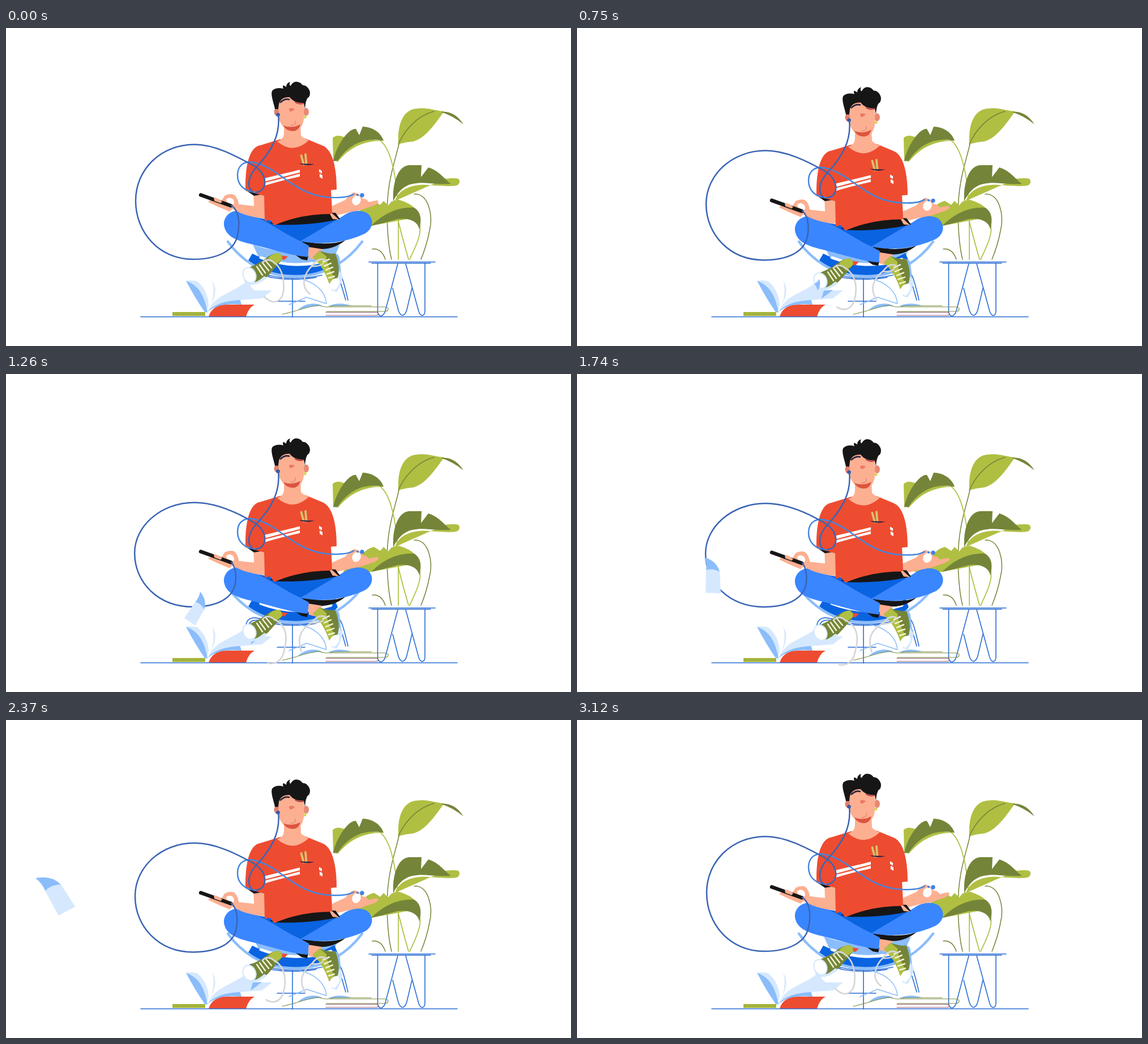
An HTML page that plays this animation: 998 px wide and 561 px high, repeating every 3150 ms.

```html
<!DOCTYPE html>
<html lang="en">
<head>
<meta charset="utf-8">
<title>Meditation</title>
<style>
  html, body { margin: 0; width: 100%; height: 100%; overflow: hidden; background: #fff; }
  svg { display: block; width: 100%; height: 100%; }
  .red { fill: #ed4c31 } .skin { fill: #fdaf91 } .ink { fill: #161616 }
  .blue { fill: #3a86ff } .deep { fill: #0a63e0 } .sky { fill: #8bbdfb } .pale { fill: #d5e8fe }
  .lime { fill: #b0bf42 } .moss { fill: #748539 } .white { fill: #fff }
  .line { fill: none; stroke-linecap: round; stroke-linejoin: round }
  .frame { stroke: #2a6dd4; stroke-width: 1.6 }
</style>
</head>
<body>
<svg viewBox="0 0 998 561">
  <g id="plant">
    <g class="line" stroke="#748539" stroke-width="1.5">
      <path d="M694 205C686 240 673 270 673 330Q674 380 681 408"/>
      <path d="M721 293C746 291 755 330 748 358Q743 384 733 408"/>
      <path d="M647 390Q663 388 670 408"/>
    </g>
    <g class="line" stroke="#b0bf42" stroke-width="1.7">
      <path d="M658 196C676 208 684 240 689 275C694 320 693 360 693 408"/>
      <path d="M685 303C690 335 703 380 711 408"/>
      <path d="M730 345C736 360 724 385 713 408"/>
    </g>
    <path class="lime" d="M693 205C691 165 704 142 728 142C745 140 757 146 774 147C757 170 742 193 720 200Q706 201 693 205Z"/>
    <path class="moss" d="M768 148C782 146 797 152 808 170Q790 155 768 148Z"/>
    <path class="line" stroke="#748539" stroke-width="1.5" d="M693 205C703 182 725 155 756 147"/>
    <path class="lime" d="M578 233L577 194Q584 187 596 192L667 199C635 198 608 209 586 236Z"/>
    <path class="moss" d="M578 235C583 208 605 176 618 178L624 189L630 174C650 175 663 186 667 199C638 192 607 202 586 234Z"/>
    <path class="lime" d="M687 305C694 283 720 274 750 277C770 279 791 280 798 277Q804 271 799 266Q793 264 775 266Z"/>
    <path class="moss" d="M684 305C682 270 694 243 712 242L734 242L733 263L746 246C764 251 774 266 786 275C755 277 739 270 718 275C700 279 692 291 684 305Z"/>
    <path class="lime" d="M595 349C612 332 622 324 628 320Q636 308 650 305L661 312L667 305L675 313L681 306L694 303Q714 309 722 318L714 336L645 349Z"/>
    <path class="moss" d="M645 349C668 326 695 315 721 317C736 326 733 344 730 356C729 344 716 334 692 337Q668 344 645 349Z"/>
    <g class="line frame">
      <path d="M641 412.800H758M646 415H750"/>
      <path d="M656.500 415V500Q657 508 663 508Q668 506 670 499L692 416"/>
      <path d="M683 459L693 498Q696 507 701 507Q706 505 708 497L717 459"/>
      <path d="M706 416L729 500Q732 508 736 507Q740 506 740 499V415"/>
    </g>
  </g>

  <g id="chair">
    <path class="sky" d="M436 382Q510 409 590 382L578 408Q510 425 447 406Z"/>
    <path class="deep" d="M435 398L428 410C452 430 480 437 510 437C550 437 573 429 586 411L580 397Q510 436 435 398Z"/>
    <path class="line" stroke="#fff" stroke-width="5" d="M450 405Q510 428 574 408"/>
    <path class="line" stroke="#8bbdfb" stroke-width="4.500" d="M392 377C412 405 450 438 510 438C570 438 608 405 629 377"/>
    <g class="line frame">
      <path d="M463 436Q510 447 558 436M468 440Q510 447 548 440"/>
      <path d="M423 453C422 426 438 426 465 437M427 453C427 432 440 430 468 440"/>
      <path d="M580 430C591 425 596 445 604 480M576 433C587 430 593 455 600 480"/>
      <path d="M506 442V510M479 482H528"/>
    </g>
    <path class="line" stroke="#8bbdfb" stroke-width="1.500" d="M518 442C546 448 564 464 566 486M500 488Q515 482 531 475L565 486"/>
  </g>

  <g id="books">
    <rect x="294" y="501" width="58" height="7" class="lime"/>
    <path stroke="#8d9c35" stroke-dasharray="1 2" stroke-width="6" d="M295 504.500H351"/>
    <path class="pale" d="M318 446Q330 444 338 447Q356 462 358 488L355 500Z"/>
    <path class="sky" d="M318 446C343 455 351 476 356 502L351 501Q333 475 318 446Z"/>
    <path class="pale" d="M364 446Q376 462 362 489Q370 464 364 446Z"/>
    <path class="sky" d="M356 501Q372 476 413 478L416 488Q376 484 356 501Z"/>
    <path class="pale" d="M357 499C370 469 404 467 427 445Q430 455 439 463L470 463L452 477L412 480Q374 482 357 499Z"/>
    <path id="flap" class="sky" d="M436 463L452 462Q443 470 432 477Z"/>
    <path class="red" d="M358 509Q364 488 392 488H439Q428 494 424 509Z"/>
    <path class="sky" d="M515 498C528 484 548 484 559 490Q536 491 515 498ZM568 491Q588 482 610 490Z"/>
    <g class="line" stroke="#7f9044" stroke-width="1.200">
      <path d="M488 505C510 501 532 491 552 489Q568 495 578 490H645"/>
      <path d="M566 500H668Q675 500 675 496Q675 492 668 492H573"/>
    </g>
    <path class="line" stroke="#955c72" stroke-width="1.200" d="M565 501.500H656Q660 505 655 507H565"/>
    <path class="line frame" d="M238 509.500H797"/>
  </g>

  <g id="body">
    <path class="red" d="M484 401L498 403L492 409L486 408Z"/>
    <path class="ink" d="M508 398L534 402L532 410L522 408Z"/>
    <path class="skin" d="M533 383L558 389L551 410L535 406Z"/>
    <path class="ink" d="M520 375Q570 386 600 374Q580 390 558 390L533 386Z"/>
    <path class="deep" d="M435 333L475 340L585 337L580 350L520 378L460 360Z"/>

    <g id="left-shoe">
      <path class="moss" d="M425 424Q446 416 458 407Q470 397 482 397Q490 402 487 409Q477 422 462 438Q450 450 438 448Z"/>
      <path class="lime" d="M463 406Q471 397 482 397Q490 402 487 409L475 418Z"/>
      <ellipse cx="430" cy="436" rx="11" ry="14" fill="#fff" stroke="#d5e8fe" stroke-width="2" transform="rotate(-25 430 436)"/>
      <path class="pale" d="M420 443Q434 458 456 438L462 440Q438 460 422 450Z"/>
      <path class="line" stroke="#f2f3d3" stroke-width="2.500" d="M443 421L453 436M448 418L458 432M453 414L464 428M458 410L469 423"/>
    </g>
    <g id="right-shoe">
      <path class="sky" d="M577 398Q587 396 589 405L592 433L586 444Z"/>
      <path class="pale" d="M589 428L595 438Q592 454 584 466L575 463Z"/>
      <path class="moss" d="M542 404L554 393Q569 399 582 398Q591 422 586 440L571 451Q561 421 542 404Z"/>
      <path class="lime" d="M542 404L554 393L566 403Q566 417 580 440L571 451Q563 424 542 404Z"/>
      <path class="white" d="M572 450Q579 438 588 443Q592 452 580 463Q571 458 572 450Z"/>
      <path class="line" stroke="#f2f3d3" stroke-width="2.500" d="M560 413L571 408M562 420L574 415M565 427L577 422M567 434L579 430M570 441L580 438"/>
    </g>

    <path class="blue" d="M410 322C394 323 384 334 385 348C388 366 403 374 432 381C472 391 505 402 533 404L535 384L520 376C565 386 612 374 635 362C650 352 650 335 637 326C622 319 607 323 593 333L520 376C485 360 450 331 410 322Z"/>

    <path class="skin" d="M437 286H458V336C430 334 411 326 400 319L395 324Q375 316 357 307L362 303L371 306L369 299L380 306L386 296Q395 291 403 294Q410 300 411 311L438 314Z"/>
    <path class="white" d="M389 302Q395 297 401 302Q405 309 401 312L390 307Z"/>
    <path stroke="#161616" stroke-width="6.500" stroke-linecap="round" d="M344 294.500L397 313.500"/>
    <path class="skin" d="M367 299Q373 299 382 306L379 309L368 305Z"/>
    <path class="skin" d="M574 284L576 314L600 303Q606 293 616 290L624 293.500L630 301L636 302L641 307L656 304Q661 308 650 313L627 321Q605 325 590 329L575 332Z"/>
    <ellipse class="white" cx="619" cy="304" rx="7.500" ry="9" transform="rotate(25 619 304)"/>

    <path class="ink" d="M466 344Q505 324 582 326L590 337Q540 349 478 347ZM422 285L438 296L450 294Z"/>
    <path class="red" d="M485 196Q507 216 529 195L558 207C578 214 584 249 584 285L574 286L576 328Q519 328 474 348L466 338L457 341L456 296L423 287C422 250 428 210 449 207Z"/>
    <path class="skin" d="M572 328L576 327L588 338L577 337Z"/>
    <g class="white">
      <path d="M457 265Q490 257 519 250V255Q490 262 457 271ZM457 273Q490 265 519 257V262Q490 268 457 278Z"/>
      <path d="M553 249L558 252V257L553 254ZM554 257L559 260V266L554 263Z"/>
    </g>
    <path class="line" stroke="#d9c36b" stroke-width="3.800" d="M521.500 225L526 241M529 223L530.500 241"/>
    <path fill="#3a2645" d="M517 239L545 240Q530 245 517 239Z"/>

    <g id="head">
      <path class="skin" d="M491 165H520L521 190Q528 196 535 198Q507 224 479 200Q491 196 491 186Z"/>
      <ellipse cx="478.500" cy="148" rx="5" ry="7" fill="#df806e"/>
      <ellipse cx="530" cy="148" rx="5" ry="7" fill="#e88972"/>
      <path class="skin" d="M481 120H527L526 161Q523 182 505 182Q487 178 482 160Z"/>
      <path fill="#dc543f" d="M490 172Q505 178 520 170Q517 182 506 182Q494 181 490 172Z"/>
      <path class="line" stroke="#b93843" stroke-width="2" d="M511 131Q517 135 525 133"/>
      <path class="ink" d="M475 143C473 132 465 113 472 109Q479 104 490 107Q488 103 490 101L495 104Q495 97 502 95Q499 101 503 102C506 93 518 92 524 101Q530 100 535 108Q539 115 535 122L533 123Q529 128 528 143L526 132Q509 133 501 122Q486 121 482 134L481 143Z"/>
      <path class="line" stroke="#282742" stroke-width="2.800" d="M485 131Q492 124 500 126"/>
      <path fill="#ec7865" d="M500 142Q506 140 510 143Q506 148 501 147Z"/>
      <path class="line" stroke="#db7562" stroke-width="1" d="M511 164Q513 172 503 172"/>
      <circle cx="528" cy="157" r="2.700" fill="#d7d55b"/>
      <circle cx="480.500" cy="153" r="3.300" fill="#34589e"/>
    </g>
    <g fill="#3d83e9"><circle cx="629" cy="295" r="3.700"/><circle cx="621" cy="294.500" r="2"/></g>
  </g>

  <g class="line" stroke="#d5d6d8" stroke-width="2.700"><path id="left-lace"/><path id="right-lace"/></g>
  <g class="line" stroke="#3a64b4" stroke-width="2.500">
    <path id="hand-cord" stroke="#4486df"/>
    <path id="phone-cord"/>
    <path id="ear-cord"/>
  </g>
  <g id="page">
    <path class="sky" d="M0 0Q22 7 27 26L14 24L3 24Q5 12 0 0Z"/>
    <path class="pale" d="M3 23Q14 19 27 26L29 64L2 63Z"/>
  </g>
</svg>
<script>
  const LOOP = 3150, STEP = 30;
  const el = id => document.getElementById(id);
  const mix = (a, b, k) => a + (b - a) * k;
  const draw = (id, d) => el(id).setAttribute("d", d);

  // Page poses: time, tip x, tip y, angle, scale.
  const poses = [
    [480, 452, 462, 65, .28], [750, 428, 443, 55, .55], [1260, 343, 384, 33, .86],
    [1740, 225, 323, 0, 1], [2160, 107, 289, -24, 1.18], [2370, 52, 279, -30, 1.23],
    [2640, -5, 273, -33, 1.23], [3030, -100, 270, -38, 1.23]
  ];

  function pagePose(t) {
    const last = poses.length - 1;
    const i = Math.max(0, poses.findIndex((p, n) => n < last && t < poses[n + 1][0]));
    const a = poses[i], b = poses[i + 1], before = poses[Math.max(0, i - 1)], after = poses[Math.min(last, i + 2)];
    const span = b[0] - a[0], u = (t - a[0]) / span;
    return [1, 2, 3, 4].map(c => {
      const m = (b[c] - before[c]) / (b[0] - before[0]) * span;
      const n = (after[c] - a[c]) / (after[0] - a[0]) * span;
      return (2*u**3 - 3*u*u + 1) * a[c] + (u**3 - 2*u*u + u) * m
        + (3*u*u - 2*u**3) * b[c] + (u**3 - u*u) * n;
    });
  }

  function render(t) {
    const k = (1 - Math.cos(2 * Math.PI * t / LOOP)) / 2;
    const drop = 20.8 * k;
    const y = v => v + drop;
    const m = (a, b) => mix(a, b, k);

    el("body").setAttribute("transform", `translate(0 ${drop})`);

    draw("ear-cord", `M481 ${y(153)}C485 ${y(190)} 468 ${y(218)} 442 ${y(246)}
      C429 ${y(260)} 424 ${y(279)} 435 ${y(289)}`);
    draw("phone-cord", `M398 ${y(313)}C${m(413, 405)} ${y(323)} ${m(413, 407)} ${m(347, 360)} ${m(409, 404)} ${m(366, 373)}
      C${m(403, 398)} ${m(394, 397)} 372 ${m(408, 411)} 330 ${m(408, 411)}
      C270 ${m(408, 411)} ${m(229, 227)} ${m(360, 370)} ${m(229, 227)} ${m(305, 317)}
      C${m(229, 227)} ${m(249, 270)} 274 ${m(205.500, 229)} 333 ${m(205.500, 229)}
      C370 ${m(205.500, 229)} 408 ${m(227, 246)} 438 ${y(243)}C463 ${y(258)} 463 ${y(287)} 442 ${y(290)}`);
    draw("hand-cord", `M442 ${y(290)}C420 ${y(289)} 409 ${y(276)} 409 ${y(260)}
      C409 ${y(239)} 425 ${y(233)} 441 ${y(238)}C486 ${y(249)} 511 ${y(297)} 575 ${y(299)}Q604 ${y(300)} 614 ${y(293)}`);

    draw("left-lace", `M453 ${y(414)}Q461 ${y(404)} 474 ${y(414)}
      C${m(493, 501)} ${m(428, 448)} ${m(494, 497)} ${m(465, 473)} ${m(486, 489)} ${m(476, 499)}
      Q${m(474, 481)} ${m(491, 516)} ${m(456, 463)} ${m(474, 514)}`);
    draw("right-lace", `M566 ${y(411)}Q553 ${y(402)} 540 ${y(420)}Q553 ${y(421)} 560 ${y(416)}
      M542 ${y(418)}C${m(525, 518)} ${m(434, 453)} ${m(520, 513)} ${m(457, 467)} ${m(537, 520)} ${m(469, 491)}`);

    const page = el("page");
    const flying = t >= 480 && t < 3030;
    page.style.display = flying ? "" : "none";
    if (flying) {
      const [px, py, angle, scale] = pagePose(t);
      page.setAttribute("transform", `translate(${px} ${py}) rotate(${angle}) scale(${scale})`);
    }
    el("flap").style.display = (t > 480 && t < 1500) || (t > 2160 && t < 2520) ? "" : "none";
  }

  function tick() {
    render(Math.floor(performance.now() % LOOP / STEP) * STEP);
    requestAnimationFrame(tick);
  }
  tick();
</script>
</body>
</html>
```
